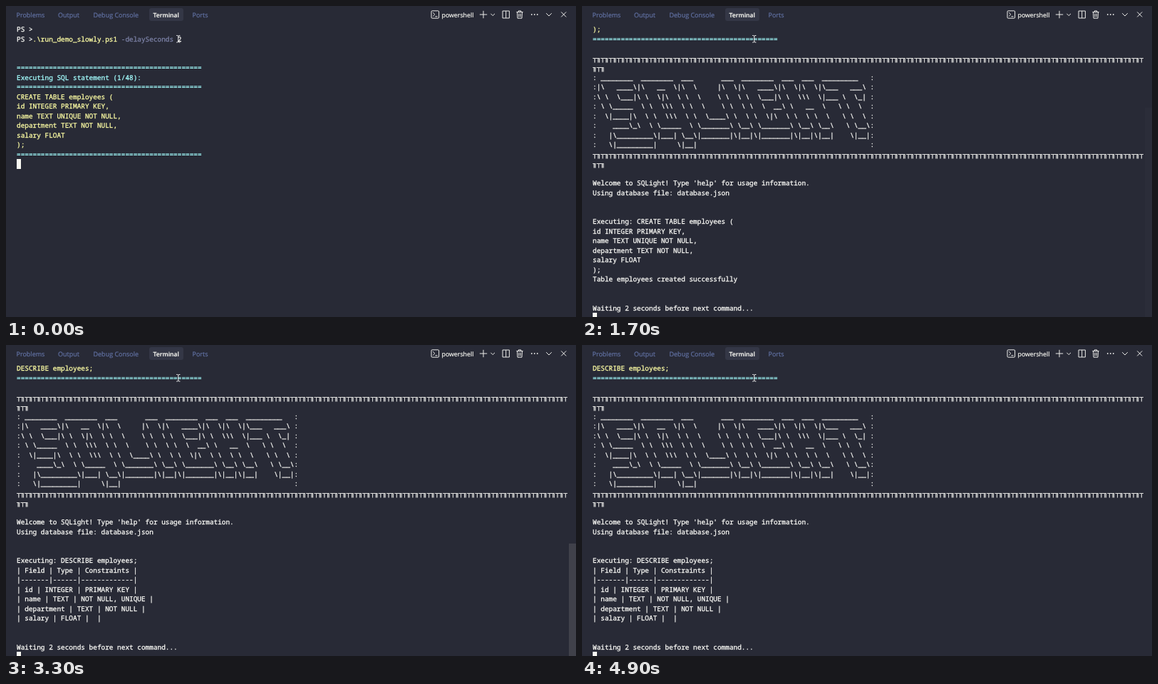
An HTML page that plays this animation: 800x437 px, repeating every 5000 ms.

```html
<!DOCTYPE html>
<html lang="en">
<head>
<meta charset="utf-8">
<title>Terminal demo</title>
<style>
  @property --n { syntax: "<integer>"; inherits: true; initial-value: 14; }

  html, body { margin: 0; width: 100%; height: 100%; overflow: hidden; background: #282a36; }
  .stage {
    --row: 13.5px;
    position: relative; width: 800px; height: 437px; overflow: hidden;
    background: #282a36; color: #fcfcf8;
    animation: print 5s step-end infinite;
  }
  .stage > svg { position: absolute; left: 0; top: 0; }

  .term { position: absolute; left: 0; top: 26.25px; width: 800px; bottom: 0; overflow: hidden; }
  .roll { position: absolute; left: 15px; top: calc(var(--row) * -1 * max(0, var(--n) - 30)); }
  .lines {
    margin: 0; height: calc(var(--row) * var(--n)); overflow: hidden;
    font: 9.415px/13.5px "Noto Sans Mono", "DejaVu Sans Mono", monospace;
    text-rendering: geometricPrecision; white-space: pre;
    -webkit-text-stroke: .3px currentColor;
  }
  .lines div { height: var(--row); }
  .c { color: #a4ffff; }
  .y { color: #ffffa5; }
  .g { color: #7b80a5; }
  .caret { width: 5.6px; height: var(--row); background: #f8f8f2; }

  .thumb {
    position: absolute; left: 790px; width: 10px; bottom: 0;
    top: calc(26px + 420px * max(0, var(--n) - 30) / (max(0, var(--n) - 30) + 31));
    background: rgba(121, 121, 121, .3);
    animation: fade 5s linear infinite;
  }

  .tabs {
    font: 9px "Open Sans", "Noto Sans", sans-serif; text-rendering: geometricPrecision;
    fill: #6272a4; stroke: #6272a4; stroke-width: .2;
  }
  .tabs .on, .tabs .shell { fill: #f8f8f2; stroke: #f8f8f2; }
  .tabs .on { font-size: 8.6px; font-weight: 600; }
  .tabs .shell { font-size: 8.8px; }
  .icons { fill: none; stroke: #ececea; stroke-width: 1; }

  /* --n is the caret's line */
  @keyframes print {
    0% { --n: 14; }
    6% { --n: 37; }
    8% { --n: 39; }
    10% { --n: 42; }
    50% { --n: 49; }
    58% { --n: 74; }
    60%, 100% { --n: 77; }
  }
  @keyframes fade {
    0%, 5.99% { opacity: 0; }
    6%, 20% { opacity: 1; }
    36%, 49.99% { opacity: 0; }
    50%, 70% { opacity: 1; }
    86%, 100% { opacity: 0; }
  }
</style>
</head>
<body>
<div class="stage">
  <div class="term">
    <div class="roll">
      <div class="lines" id="lines"></div>
      <div class="caret"></div>
    </div>
  </div>
  <div class="thumb"></div>
  <svg width="800" height="437" viewBox="0 0 800 437">
    <rect x="201" y="3" width="48" height="18" rx="3" fill="#343746"/>
    <g class="tabs">
      <text x="14.5" y="16">Problems</text>
      <text x="73" y="16">Output</text>
      <text x="122.5" y="16">Debug Console</text>
      <text class="on" x="206.5" y="16">Terminal</text>
      <text x="261.5" y="16">Ports</text>
      <text class="shell" x="611.5" y="16">powershell</text>
    </g>
    <g class="icons">
      <rect x="597" y="6.8" width="10.6" height="10.4" rx="1.2"/>
      <path d="M599.2 9.2l2.6 2.6-2.6 2.6M602.4 14.8h3.2"/>
      <path d="M670 6.8v10.4M664.8 12h10.4"/>
      <path d="M680.4 10.8l2.8 2.8 2.8-2.8"/>
      <path d="M697 7h9.4v10H697zM701.7 7v10"/>
      <path d="M716.4 8.5h9.2M719.3 8.5V6.8h3.4v1.7M717.5 8.5l.5 8.7h6l.5-8.7M719.9 10.5v4.8M722.1 10.5v4.8"/>
      <path d="M758.2 10.2l3.8 3.8 3.8-3.8"/>
      <path d="M779.2 8.4l7 7M786.2 8.4l-7 7"/>
      <g fill="#ececea" stroke="none">
        <circle cx="737.8" cy="12" r=".9"/><circle cx="741.8" cy="12" r=".9"/><circle cx="745.8" cy="12" r=".9"/>
      </g>
    </g>
    <path d="M239.2 41.5h1.6l1 .8 1-.8h1.6M241.8 42v8.6M239.2 51h1.6l1-.8 1 .8h1.6" fill="none" stroke="#eee"/>
  </svg>
</div>
<script>
  const art = String.raw`
: ________  ________  ___       ___  ________  ___  ___  _________   :
:|\   ____\|\   __  \|\  \     |\  \|\   ____\|\  \|\  \|\___   ___\ :
:\ \  \___|\ \  \|\  \ \  \    \ \  \ \  \___|\ \  \\\  \|___ \  \_| :
: \ \_____  \ \  \\\  \ \  \    \ \  \ \  \  __\ \   __  \   \ \  \  :
:  \|____|\  \ \  \\\  \ \  \____\ \  \ \  \|\  \ \  \ \  \   \ \  \ :
:    ____\_\  \ \_____  \ \_______\ \__\ \_______\ \__\ \__\   \ \__\:
:   |\_________\|___| \__\|_______|\|__|\|_______|\|__|\|__|    \|__|:
:   \|_________|     \|__|                                           :`.trim().split("\n");

  const createSql = [
    "CREATE TABLE employees (", "id INTEGER PRIMARY KEY,", "name TEXT UNIQUE NOT NULL,",
    "department TEXT NOT NULL,", "salary FLOAT", ");"
  ];
  const describeSql = ["DESCRIBE employees;"];
  const describeOut = [
    "| Field | Type | Constraints |",
    "|-------|------|-------------|",
    "| id | INTEGER | PRIMARY KEY |",
    "| name | TEXT | NOT NULL, UNIQUE |",
    "| department | TEXT | NOT NULL |",
    "| salary | FLOAT |  |"
  ];

  const paint = (cls, text) => `<span class="${cls}">${text}</span>`;
  const rule = paint("c", "=".repeat(46));
  const edge = "┬╖".repeat(70);
  const border = [edge.slice(0, 137), edge.slice(137)];  // wraps at 137 columns

  const statement = (num, sql) => [
    "", "", rule, paint("c", `Executing SQL statement (${num}/48):`), rule,
    ...sql.map(line => paint("y", line)), rule
  ];
  const session = (sql, output) => [
    "", ...border, ...art, ...border, "",
    "Welcome to SQLight! Type 'help' for usage information.",
    "Using database file: database.json", "", "",
    "Executing: " + sql[0], ...sql.slice(1), ...output, "", "",
    "Waiting 2 seconds before next command..."
  ];

  const rows = [
    "PS &gt;",
    "PS &gt;" + paint("y", ".\\run_demo_slowly.ps1") + paint("g", " -delaySeconds") + " 2",
    ...statement(1, createSql),
    ...session(createSql, ["Table employees created successfully"]),
    ...statement(2, describeSql),
    ...session(describeSql, describeOut)
  ];
  document.getElementById("lines").innerHTML = rows.map(row => `<div>${row}</div>`).join("");
</script>
</body>
</html>
```
